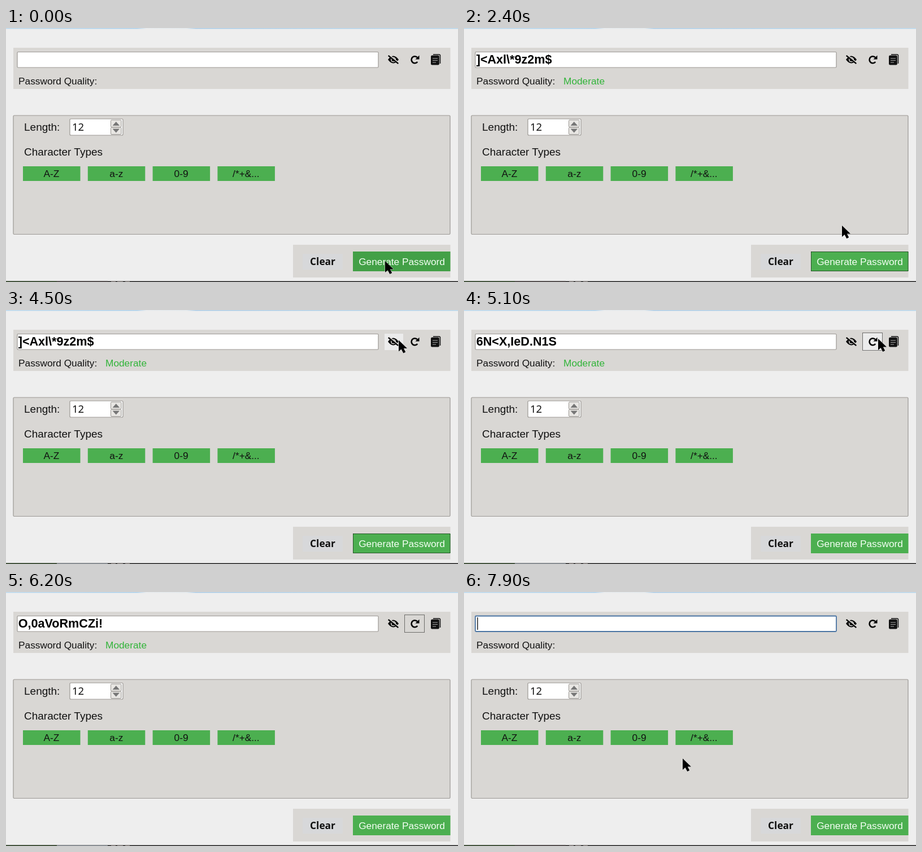
An HTML page for the animation above (8000 ms loop, 800x450 px).

```html
<!DOCTYPE html>
<html lang="en">
<head>
<meta charset="utf-8">
<title>Password generator</title>
<style>
  html, body { margin: 0; width: 100%; height: 100%; overflow: hidden; background: #eee; }
  svg { display: block; width: 800px; height: 450px; }
  text { font: 17.3px "Liberation Sans", Arial, sans-serif; fill: #111; white-space: pre; }
  .mid { text-anchor: middle; }
  .head { font-size: 19px; }
  .noto { font-family: "Noto Sans", "Open Sans", sans-serif; }
  .panel { fill: #d9d7d4; }
  .green { fill: #4caf50; }
  .focus { fill: none; stroke: #000; stroke-dasharray: 1 1; }
  #password { font-size: 21.6px; font-weight: bold; fill: #000; }
</style>
</head>
<body>
<svg viewBox="0 0 800 450">
  <defs>
    <linearGradient id="sky">
      <stop offset="0" stop-color="#b9d8ee"/>
      <stop offset=".29" stop-color="#a9cfec"/>
      <stop offset=".31" stop-color="#e6eaed"/>
      <stop offset=".4" stop-color="#e2e8ec"/>
      <stop offset=".42" stop-color="#a9cbe6"/>
      <stop offset="1" stop-color="#b5d4ea"/>
    </linearGradient>
  </defs>
  <rect width="800" height="450" fill="#eee"/>
  <rect width="800" height="1.5" fill="url(#sky)"/>
  <rect y="448.5" width="800" height="1.5" fill="#1c1c1c"/>
  <rect y="448.5" width="90" height="1.5" fill="#34482c"/>
  <rect id="ground" x="90" y="448.5" width="90" height="1.5"/>
  <path d="M186 449.2h8m3 0h10m4 0h8" stroke="#8b8583" stroke-width="1.5"/>

  <rect class="panel" x="13" y="35" width="773.5" height="73"/>
  <rect id="entry" x="20" y="42.5" width="639" height="27.5" rx="1.5" fill="#fff"/>
  <text id="password" x="21.7" y="63"></text>
  <path id="caret" d="M24 45v22" stroke="#000" stroke-width="1.3"/>
  <text x="22" y="99.5">Password Quality:</text>
  <text id="quality" x="176" y="99.5" style="fill:#32b43a">Moderate</text>

  <rect id="eyeHover" x="670" y="42" width="33" height="29" fill="#ececec"/>
  <g transform="translate(685.5 56)">
    <path d="M-9.5 0Q0-13 9.5 0Q0 13-9.5 0Z"/>
    <circle r="4.6" class="panel"/>
    <circle r="3"/>
    <circle cx="-1.2" cy="-1.2" r="1.2" class="panel"/>
    <g id="slash">
      <path d="M-7.6-8.5L9.8 5.8" stroke="#d9d7d4" stroke-width="2"/>
      <path d="M-8.8-7.2L8.8 7.2" stroke="#000" stroke-width="2.3"/>
    </g>
  </g>

  <rect id="redoHover" x="706" y="41" width="34.5" height="31" fill="#ececec"/>
  <rect id="redoFocus" class="focus" x="705.5" y="40.5" width="35" height="31"/>
  <g transform="translate(723.5 56)">
    <path d="M4.5-3.8A6 6 0 1 0 4.7 4" fill="none" stroke="#000" stroke-width="2.6"/>
    <path d="M8-7.5V-.6H1Z"/>
  </g>

  <path d="M756 47h10.5q2 0 2 2v14" fill="none" stroke="#111" stroke-width="1.5"/>
  <rect x="752" y="48.5" width="14.8" height="17" rx="2" fill="#111"/>
  <path d="M755 54h9m-9 3.5h9m-9 3.5h6" stroke="#aaa" stroke-width="1.1"/>

  <rect class="panel" x="13" y="155" width="773" height="210.5" rx="1.5" stroke="#9b9894" stroke-width="1.2"/>
  <text class="head" x="32" y="182">Length:</text>
  <rect x="113" y="161" width="94" height="29" rx="2" fill="#fff" stroke="#9b9894" stroke-width="1.2"/>
  <g fill="#e8e6e3" stroke="#9b9894">
    <rect x="185.5" y="163" width="18.5" height="12.5" rx="1.5"/>
    <rect x="185.5" y="176" width="18.5" height="12.5" rx="1.5"/>
  </g>
  <path d="M188.5 173l6.3-7 6.3 7zM188.5 178.5h12.6l-6.3 7z" fill="#777"/>
  <text class="noto" style="font-size:18.5px" x="117" y="182">12</text>
  <text class="head" x="32" y="226.3">Character Types</text>
  <g id="types"></g>

  <rect class="panel" x="508" y="384" width="278.5" height="58"/>
  <rect id="clearButton" x="525" y="400" width="71" height="28"/>
  <text class="noto mid" style="font-weight:bold" x="560.5" y="420">Clear</text>
  <rect id="generate" x="614" y="396" width="172.5" height="35"/>
  <rect id="generateFocus" class="focus" x="614.5" y="396.5" width="171.5" height="34"/>
  <text class="mid" style="fill:#f4fff4" x="700.5" y="419.7">Generate Password</text>

  <path id="cursor" d="M0 0V20L4.6 16L8.3 23L12.2 21L8.8 14.5H15Z" stroke="#eee" stroke-width="1" paint-order="stroke"/>
</svg>
<script>
const DURATION = 8000, STEP = 100;
const $ = id => document.getElementById(id);

$("types").innerHTML = ["A-Z", "a-z", "0-9", "/*+&amp;..."].map((label, i) => {
  const x = 30 + i * 114.8;
  return `<rect class="green" x="${x}" y="245" width="101.5" height="26"/>
    <text class="mid" x="${x + 50.5}" y="264.3">${label}</text>`;
}).join("");

// [time, x, y] of the pointer tip
const path = [
  [0, 671, 413], [700, 671, 413], [1200, 672, 414], [2100, 672, 414],
  [2400, 669, 350], [3000, 688, 54], [4400, 688, 54], [4800, 733, 51],
  [5700, 733, 51], [6000, 600, 56], [6300, 245, 66], [6400, 245, 91],
  [7000, 560, 408], [7400, 560, 408], [7900, 387, 295]
];

// [start time, text]
const passwords = [
  [0, ""], [500, "FXj8}^_:L01V"], [1500, "q7R(Wd;3&TzK"], [2100, "]<Axl\\*9z2m$"],
  [4900, "6N<X,IeD.N1S"], [5600, "O,0aVoRmCZi!"], [7400, ""]
];

function pointerAt(t) {
  const i = Math.max(1, path.findIndex(p => p[0] >= t));
  const [t0, x0, y0] = path[i - 1], [t1, x1, y1] = path[i];
  const u = (t - t0) / (t1 - t0), ease = u * u * (3 - 2 * u);
  return [x0 + (x1 - x0) * ease, y0 + (y1 - y0) * ease];
}

const show = (id, on) => $(id).setAttribute("visibility", on ? "visible" : "hidden");
const between = (t, from, to) => t >= from && t < to;

function render(t) {
  const [x, y] = pointerAt(t);
  const over = (left, top, right, bottom) => between(x, left, right) && between(y, top, bottom);
  const text = passwords.filter(p => p[0] <= t).pop()[1];
  const masked = between(t, 3200, 4000);
  const cleared = t >= 7400;

  $("cursor").setAttribute("transform", `translate(${x} ${y})`);
  show("cursor", !over(20, 42, 659, 70));

  $("password").textContent = masked ? "*".repeat(text.length) : text;
  $("password").style.letterSpacing = masked ? "-.3px" : "0";
  show("quality", text);
  show("slash", !masked);

  show("eyeHover", over(669, 41, 703, 72));
  show("redoHover", over(706, 41, 740, 72));
  show("redoFocus", between(t, 4900, 7400));
  show("generateFocus", between(t, 500, 4900));
  $("generate").setAttribute("fill", over(614, 396, 787, 431) ? "#43a047" : "#4caf50");
  $("clearButton").setAttribute("fill", over(525, 400, 596, 428) ? "#ececec" : "#d7d8da");

  show("caret", cleared);
  $("entry").setAttribute("stroke", cleared ? "#4b75a3" : "#9b9894");
  $("entry").setAttribute("stroke-width", cleared ? 1.8 : 1.2);
  $("ground").setAttribute("fill", between(t, 2800, 7300) ? "#8b9298" : "#4a4444");
}

const start = performance.now();
function tick() {
  const elapsed = (performance.now() - start) % DURATION;
  render(Math.floor(elapsed / STEP) * STEP);
  requestAnimationFrame(tick);
}
tick();
</script>
</body>
</html>
```
